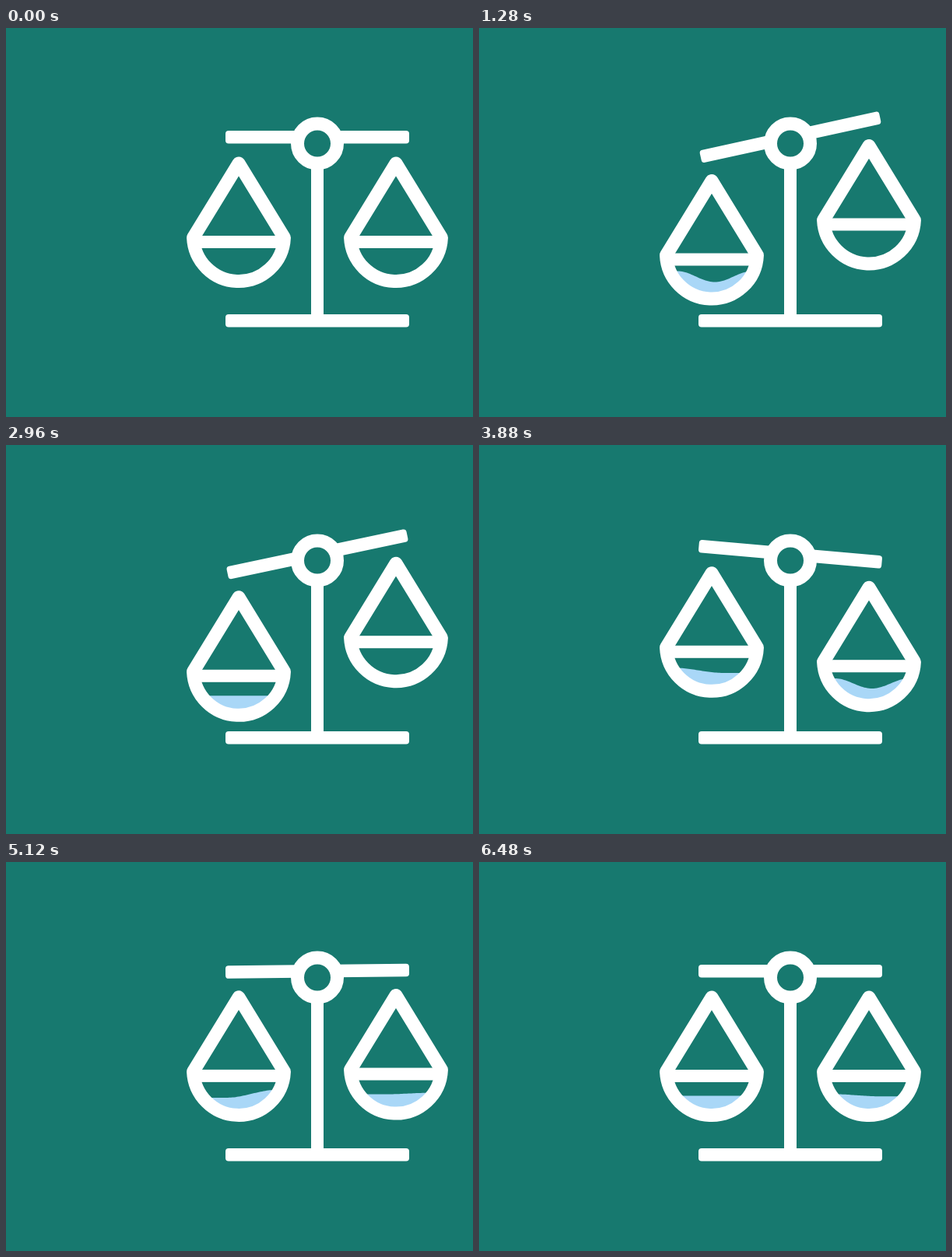
These frames come from a looping animation (600x500 px, 6.52 s). An HTML page with a canvas:

```html
<!DOCTYPE html>
<html lang="en">
<head>
<meta charset="utf-8">
<title>Balance</title>
<style>
html, body { margin: 0; width: 100%; height: 100%; overflow: hidden; background: #17796f; }
canvas { display: block; width: 600px; height: 500px; }
</style>
</head>
<body>
<canvas id="stage" width="600" height="500"></canvas>
<script>
const ctx = document.getElementById('stage').getContext('2d');
const LOOP = 6520, STEP = 40;
const BG = '#17796f', WHITE = '#ffffff', WATER = '#a9d7f7';
const OMEGA = 2 * Math.PI / 1440;
const FALL = 300;

const clamp = v => Math.max(0, Math.min(1, v));
const ease = v => { v = clamp(v); return v * v * (3 - 2 * v); };

// Eased interpolation through [time, value] pairs
function track(keys, t) {
  if (t <= keys[0][0]) return keys[0][1];
  for (let i = 1; i < keys.length; i++) {
    const [t0, v0] = keys[i - 1], [t1, v1] = keys[i];
    if (t < t1) return v0 + (v1 - v0) * ease((t - t0) / (t1 - t0));
  }
  return keys[keys.length - 1][1];
}

const pans = [
  {
    x: 299, side: 1, start: 560,
    dip: [[860, 0], [960, 5], [1280, 7], [1720, 0]],
    slosh: [[1280, 0], [1620, -6], [2000, 3], [2440, -3], [2960, 0], [3560, 0],
            [3880, -6.5], [5120, 10], [5800, -5], [6440, 0]]
  },
  {
    x: 501, side: -1, start: 3200,
    dip: [[3500, 0], [3600, 5], [3880, 6.5], [4360, 0]],
    slosh: [[3880, 0], [4400, -6], [5120, 2], [5700, 5], [6480, -3]]
  }
];

// Vertical travel of the left pan: two damped swings, one per drop
function swing(t) {
  const a = t - 785;
  let y = 15.5 * (1 - Math.exp(-0.000414 * a) * Math.cos(OMEGA * a));
  y *= ease((t - 850) / 170);
  if (t > 3500) {
    const b = t - 4110;
    const back = -13 * Math.exp(-0.0012 * b) * Math.cos(OMEGA * b);
    y = t > 3640 ? back : Math.min(y, back);
  }
  return y * clamp((6480 - t) / 400);
}

const lift = t => -2.2 * Math.exp(-Math.pow((t - 4900) / 300, 2));

function bar(x, y, w, h, r) {
  ctx.beginPath();
  ctx.roundRect(x, y, w, h, r);
  ctx.fill();
}

function drawDrop(pan, t) {
  const age = t - pan.start;
  if (age < 0 || age > FALL) return;
  const top = -25 + 0.95 * age + 0.0004 * age * age;
  ctx.fillStyle = WATER;
  ctx.beginPath();
  ctx.moveTo(pan.x, top);
  ctx.bezierCurveTo(pan.x + 4, top + 9, pan.x + 13, top + 16, pan.x + 13, top + 24);
  ctx.arc(pan.x, top + 24, 13, 0, Math.PI);
  ctx.bezierCurveTo(pan.x - 13, top + 16, pan.x - 4, top + 9, pan.x, top);
  ctx.fill();
}

function surface(u, dip, slosh) {
  const size = Math.abs(slosh);
  const hump = ease((Math.sign(slosh) * u + 0.3) / 1.3);
  return 300.5 - dip / 2 + dip * Math.cos(Math.PI * (u - 0.08))
    + size * (0.25 - hump);
}

function drawWater(pan, t) {
  const age = t - pan.start - FALL;
  if (age <= 0) return;
  const dip = track(pan.dip, t), slosh = track(pan.slosh, t);
  const low = 18 * (1 - ease(age / 120));
  ctx.save();
  ctx.beginPath();
  ctx.arc(pan.x, 267, 52, 0, Math.PI);
  ctx.clip();
  ctx.fillStyle = WATER;
  ctx.beginPath();
  ctx.moveTo(pan.x - 54, 330);
  for (let dx = -54; dx <= 54; dx += 2) {
    const u = Math.max(-1, Math.min(1, dx / 48));
    ctx.lineTo(pan.x + dx, surface(u, dip, slosh) + low);
  }
  ctx.lineTo(pan.x + 54, 330);
  ctx.fill();
  ctx.restore();
}

function drawPan(pan, t) {
  ctx.save();
  ctx.translate(0, pan.side * swing(t) + lift(t));
  drawWater(pan, t);
  ctx.strokeStyle = ctx.fillStyle = WHITE;
  ctx.lineWidth = 17;
  ctx.lineJoin = 'round';
  const tilt = Math.asin(2.5 / 58.5);
  ctx.beginPath();
  ctx.moveTo(pan.x, 174);
  ctx.lineTo(pan.x + 58.4, 269.5);
  ctx.arc(pan.x, 267, 58.5, tilt, Math.PI - tilt);
  ctx.closePath();
  ctx.stroke();
  ctx.fillRect(pan.x - 58, 267, 116, 16);
  ctx.restore();
}

function drawStand(t) {
  ctx.fillStyle = WHITE;
  bar(282, 368, 236, 16.5, 4);
  ctx.fillRect(392, 175, 16, 196);

  ctx.save();
  ctx.translate(400, 140.3);
  ctx.rotate(-Math.asin(swing(t) / 105));
  bar(-118, -8.3, 236, 16.6, 4);
  ctx.restore();

  ctx.beginPath();
  ctx.arc(400, 148.5, 25.5, 0, 2 * Math.PI);
  ctx.fillStyle = BG;
  ctx.fill();
  ctx.strokeStyle = WHITE;
  ctx.lineWidth = 17;
  ctx.stroke();
}

function draw(t) {
  ctx.fillStyle = BG;
  ctx.fillRect(0, 0, 600, 500);
  pans.forEach(p => drawDrop(p, t));
  pans.forEach(p => drawPan(p, t));
  drawStand(t);
}

const begin = performance.now();
function tick() {
  const t = (performance.now() - begin) % LOOP;
  draw(Math.floor(t / STEP) * STEP);
  requestAnimationFrame(tick);
}
tick();
</script>
</body>
</html>
```
